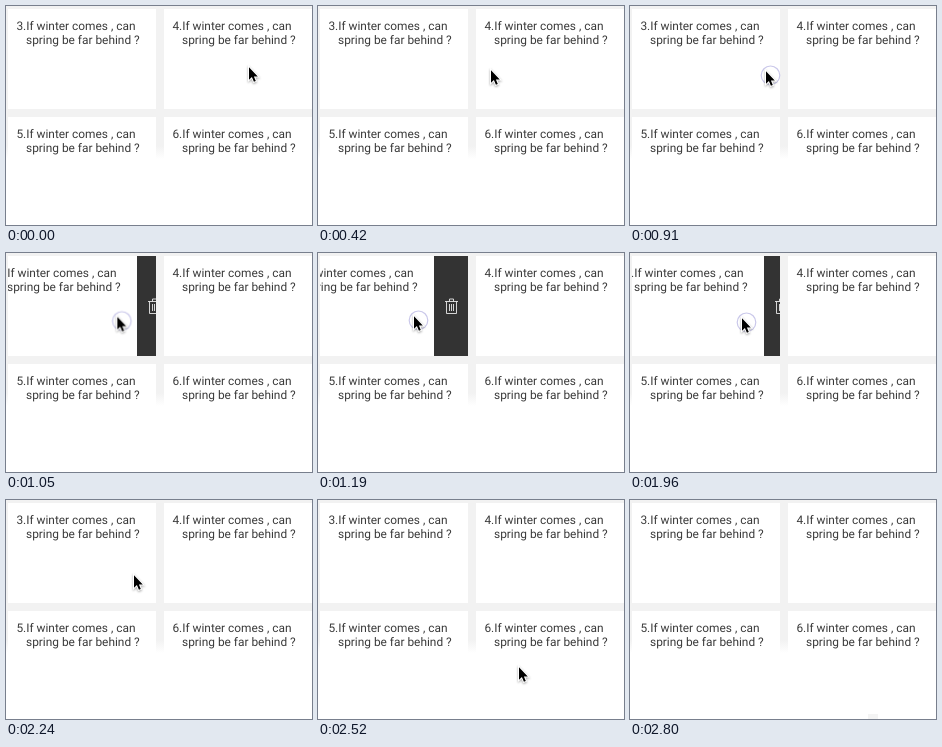
These frames come from a looping animation (306 by 219 pixels, 2870 ms). An HTML page:

```html
<!DOCTYPE html>
<html lang="en">
<head>
<meta charset="utf-8">
<title>Swipe to delete</title>
<style>
  html, body { margin: 0; width: 100%; height: 100%; overflow: hidden; background: #fff; }
  svg { display: block; width: 306px; height: 219px; }
  text { font: 11.9px Roboto, Arial, sans-serif; fill: #3a3a3a; white-space: pre; text-rendering: geometricPrecision; }

  /* 41 steps of 70 ms; every segment advances in whole steps */
  .slide, .pointer, .ring, .trace { animation: 2870ms step-end infinite; }
  .slide { animation-name: slide; }
  .pointer { animation-name: point; }
  .ring { animation-name: press; }
  .trace { animation-name: trace; }
  .arrow { filter: drop-shadow(0 1px 1px rgba(0, 0, 0, .35)); }

  @keyframes slide {
    0% { transform: translateX(0); }
    34.146% { transform: translateX(-6px); }
    36.585% { transform: translateX(-19px); }
    39.024% { transform: translateX(-33px); }
    41.463% { transform: translateX(-34px); }
    63.414% { transform: translateX(-34px); animation-timing-function: steps(2); }
    68.292% { transform: translateX(-16px); animation-timing-function: steps(2); }
    73.170%, 100% { transform: translateX(0); }
  }
  @keyframes point {
    0% { transform: translate(242px, 60px); animation-timing-function: steps(6); }
    14.634% { transform: translate(172px, 63px); animation-timing-function: steps(2); }
    19.512% { transform: translate(143px, 64px); animation-timing-function: steps(5); }
    31.707% { transform: translate(135px, 64px); animation-timing-function: steps(3); }
    39.024% { transform: translate(98px, 62px); }
    41.463% { transform: translate(95px, 62px); animation-timing-function: steps(2); }
    46.341% { transform: translate(88px, 63px); }
    51.219% { transform: translate(88px, 63px); animation-timing-function: steps(3); }
    58.536% { transform: translate(86px, 63px); animation-timing-function: steps(2); }
    63.414% { transform: translate(92px, 63px); animation-timing-function: steps(2); }
    68.292% { transform: translate(111px, 64px); animation-timing-function: steps(2); }
    73.170% { transform: translate(126px, 66px); animation-timing-function: steps(2); }
    78.048% { transform: translate(127px, 74px); animation-timing-function: steps(4); }
    87.804% { transform: translate(200px, 166px); animation-timing-function: steps(3); }
    95.121% { transform: translate(233px, 205px); }
    97.560%, 100% { transform: translate(238px, 230px); }
  }
  @keyframes press {
    0%, 51.219%, 73.170%, 100% { opacity: 0; }
    29.268%, 58.536% { opacity: 1; }
  }
  @keyframes trace {
    0% { opacity: 0; }
    97.560%, 100% { opacity: 1; }
  }
</style>
</head>
<body>
<svg viewBox="0 0 306 219">
  <defs>
    <clipPath id="card"><rect x="2" y="3" width="148" height="100"/></clipPath>
    <linearGradient id="fade" gradientUnits="userSpaceOnUse" x1="0" y1="140" x2="0" y2="153" gradientTransform="translate(0 0)">
      <stop offset="0" stop-color="#f2f2f2"/>
      <stop offset="1" stop-color="#fff"/>
    </linearGradient>
    <text id="line2" x="20" y="38">spring be far behind ?</text>
  </defs>

  <rect width="306" height="153" fill="url(#fade)"/>
  <g fill="#fff">
    <rect x="2" y="3" width="148" height="100"/>
    <rect x="158" y="3" width="148" height="100"/>
    <rect x="2" y="111" width="148" height="42"/>
    <rect x="158" y="111" width="148" height="42"/>
  </g>

  <g clip-path="url(#card)">
    <g class="slide">
      <text x="10.4" y="24">3.If winter comes , can</text>
      <use href="#line2"/>
      <rect x="150" y="3" width="36" height="100" fill="#333"/>
      <path d="M161 48.5h13M165.5 48.5v-2.5h4v2.5M162.5 48.5v12h10v-12M165.5 51v7M167.5 51v7M169.5 51v7"
            fill="none" stroke="#e8e8e8" stroke-width=".9"/>
    </g>
  </g>
  <g transform="translate(156 0)">
    <text x="10.4" y="24">4.If winter comes , can</text>
    <use href="#line2"/>
  </g>
  <g transform="translate(0 108)">
    <text x="10.4" y="24">5.If winter comes , can</text>
    <use href="#line2"/>
  </g>
  <g transform="translate(156 108)">
    <text x="10.4" y="24">6.If winter comes , can</text>
    <use href="#line2"/>
  </g>

  <rect class="trace" x="238" y="214" width="10" height="5" fill="#f4f4f4"/>
  <g class="pointer">
    <circle class="ring" cx="5.5" cy="5.3" r="9.3" fill="#fff" fill-opacity=".5" stroke="#cac8ea" stroke-width="1.2"/>
    <path class="arrow" d="M1 1.3V13.8L3.9 11.1L5.9 15.7L7.8 14.9L5.9 10.4H9.8Z"
          stroke="#fff" stroke-width="2" paint-order="stroke"/>
  </g>
</svg>
</body>
</html>
```
